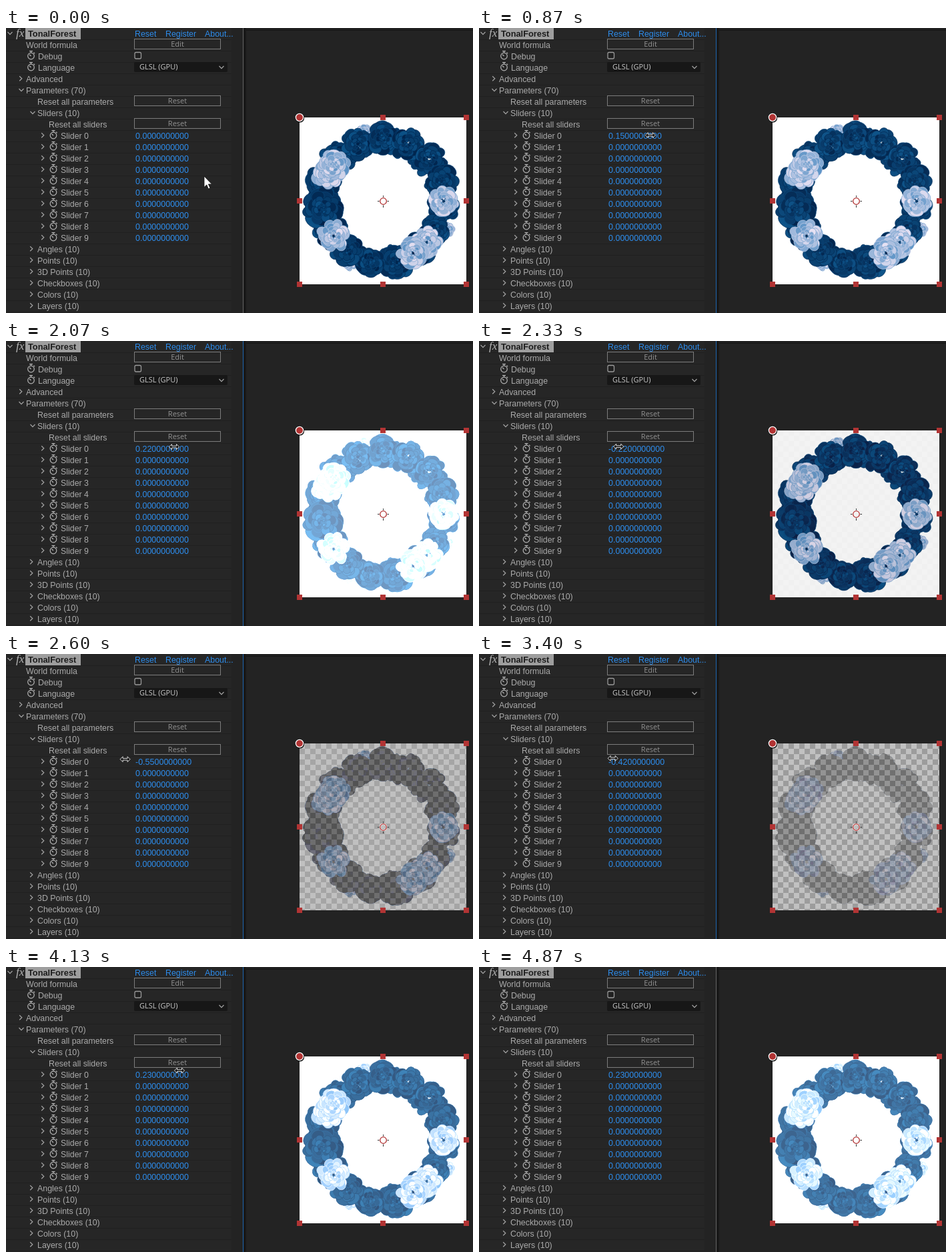
An HTML page for the animation above (4940 ms loop, 700x427 px).

```html
<!DOCTYPE html>
<html lang="en">
<head>
<meta charset="utf-8">
<title>Slider brightness</title>
<style>
  html, body { margin: 0; width: 100%; height: 100%; overflow: hidden; background: #232323; }
  svg { display: block; width: 700px; height: 427px; }
  text { font: 12.4px "Liberation Sans", Arial, sans-serif; fill: #aaa; white-space: pre; }
  .link { fill: #2d8ceb; }
  .value { fill: #2d8ceb; font-size: 12.5px; }
  .ui { font: 11px "Open Sans", "Noto Sans", sans-serif; fill: #929292; }
  .choice { fill: #c8c8c8; }
  .title { font-weight: bold; font-size: 12.8px; fill: #1c1c1c; }
  .fx { font: italic 17px "Liberation Serif", serif; fill: #b4b4b4; }
</style>
</head>
<body>
<svg viewBox="0 0 700 427" xmlns="http://www.w3.org/2000/svg">
  <defs>
    <pattern id="checker" x="440" y="134" width="16" height="16" patternUnits="userSpaceOnUse">
      <rect width="16" height="16" fill="#fff"/>
      <path d="M8 0h8v8h-8zM0 8h8v8h-8z" fill="#c0c0c0"/>
    </pattern>
    <filter id="shift" filterUnits="userSpaceOnUse" x="440" y="134" width="250" height="250"
            color-interpolation-filters="sRGB">
      <feColorMatrix id="matrix" type="matrix"/>
    </filter>
  </defs>
  <rect width="700" height="427" fill="#232323"/>
  <g id="panel"></g>
  <rect id="divider" x="355" width="1" height="427"/>
  <rect x="356" width="4" height="427" fill="#181818"/>
  <rect x="360" y="2" width="340" height="2" fill="#191919"/>
  <rect x="440" y="134" width="250" height="250" fill="url(#checker)"/>
  <g filter="url(#shift)">
    <rect x="440" y="134" width="250" height="250" fill="#fff"/>
    <g id="wreath"></g>
  </g>
  <g id="handles"></g>
  <path id="arrow" d="M0 0V16.5L3.8 13 6.4 19 9 17.9 6.4 12H11.5Z" fill="#fff" stroke="#111" stroke-width=".8"/>
  <path id="scrub" d="M-7.5 0L-3.5 -4V-1.3H3.5V-4L7.5 0 3.5 4V1.3H-3.5V4Z" fill="#161616" stroke="#f0f0f0" stroke-width=".9"/>
</svg>
<script>
const LOOP = 4940;
const STEP = 200 / 3;
const $ = id => document.getElementById(id);

function add(parent, tag, attrs, content) {
  const el = document.createElementNS('http://www.w3.org/2000/svg', tag);
  for (const key in attrs) el.setAttribute(key, attrs[key]);
  if (content !== undefined) el.textContent = content;
  parent.appendChild(el);
  return el;
}

// ---- Effect panel ----
const panel = $('panel');
const rowY = row => 8.3 + 17 * row;
const label = (x, row, text, cls = '') =>
  add(panel, 'text', { x, y: rowY(row) + 4.7, class: cls }, text);

function caret(x, row, open) {
  const d = open ? 'm-3.5 -1.8 3.5 3.6 3.5 -3.6' : 'm-1.8 -3.5 3.6 3.5 -3.6 3.5';
  add(panel, 'path', { d: `M${x} ${rowY(row) - 0.5}${d}`, fill: 'none', stroke: '#a4a4a4', 'stroke-width': 1.2 });
}

function stopwatch(x, row) {
  add(panel, 'path', {
    d: 'M-4.8 0a4.8 4.8 0 1 0 9.6 0a4.8 4.8 0 1 0 -9.6 0M-2.5 -7.3h5m-2.5 0v2.5M0 0l-2.4 -2.2M4 -5.2l1.6 1.4',
    transform: `translate(${x} ${rowY(row) - 0.3})`, fill: 'none', stroke: '#b4b4b4', 'stroke-width': 1.2
  });
}

function button(row, text) {
  const y = 17 * row;
  add(panel, 'rect', { x: 192.5, y: y - 0.5, width: 129, height: 15, fill: '#262626', stroke: '#7c7c7c' });
  add(panel, 'text', { x: 257, y: y + 11, class: 'ui', 'text-anchor': 'middle' }, text);
}

add(panel, 'rect', { width: 338, height: 427, fill: '#262626' });
for (let y = 17; y < 427; y += 17) add(panel, 'rect', { y, width: 338, height: 1, fill: '#202020' });

caret(6, 0, true);
add(panel, 'text', { x: 15, y: 12.5, class: 'fx' }, 'fx');
add(panel, 'rect', { x: 29, width: 83, height: 17, fill: '#9e9e9e' });
label(33, 0, 'TonalForest', 'title');
label(193, 0, 'Reset', 'link');
label(239, 0, 'Register', 'link');
label(298, 0, 'About...', 'link');

label(30, 1, 'World formula');
button(1, 'Edit');
stopwatch(37.5, 2);
label(48, 2, 'Debug');
add(panel, 'rect', { x: 193, y: 36.5, width: 9.5, height: 9.5, rx: 2, fill: '#202020', stroke: '#999', 'stroke-width': 1.3 });
stopwatch(37.5, 3);
label(48, 3, 'Language');
add(panel, 'rect', { x: 192, y: 51, width: 140, height: 15, rx: 2, fill: '#171717' });
add(panel, 'text', { x: 200, y: 62, class: 'ui choice' }, 'GLSL (GPU)');
caret(323, 3, true);

caret(22, 4, false);
label(30, 4, 'Advanced');
caret(23, 5, true);
label(30, 5, 'Parameters (70)');
label(47, 6, 'Reset all parameters');
button(6, 'Reset');
caret(40, 7, true);
label(47, 7, 'Sliders (10)');
label(64, 8, 'Reset all sliders');
button(8, 'Reset');

const values = [];
for (let i = 0; i < 10; i++) {
  caret(55, 9 + i, false);
  stopwatch(71, 9 + i);
  label(82, 9 + i, `Slider ${i}`);
  values.push(label(194, 9 + i, '0.0000000000', 'value'));
}
['Angles', 'Points', '3D Points', 'Checkboxes', 'Colors', 'Layers'].forEach((name, i) => {
  caret(38, 19 + i, false);
  label(47, 19 + i, `${name} (10)`);
});

// ---- Flower wreath ----
const TAU = Math.PI * 2;
const NAVY = [[0, 34, 74], [12, 82, 136]];
const PALE = [[92, 146, 196], [228, 222, 240]];
const wreath = $('wreath');
let seed = 11;
const rnd = () => (seed = (seed * 16807) % 2147483647) / 2147483647;
const tint = ([a, b], k) => `rgb(${a.map((c, i) => Math.round(c + (b[i] - c) * k))})`;
const polar = (x, y, dist, angle) => [x + dist * Math.cos(angle), y + dist * Math.sin(angle)];

function petal(x, y, dist, angle, rx, ry, colors) {
  const [px, py] = polar(x, y, dist, angle);
  const shade = rnd();
  add(wreath, 'ellipse', {
    rx: rx.toFixed(1), ry: ry.toFixed(1), fill: tint(colors, shade),
    stroke: tint(colors, shade > 0.5 ? 0.1 : 0.8), 'stroke-width': 0.6,
    transform: `translate(${px.toFixed(1)} ${py.toFixed(1)}) rotate(${(angle * 360 / TAU).toFixed(0)})`
  });
}

// Loose whorls of petals, tighter towards the heart.
function flower(x, y, r, colors) {
  for (let k = 0; k < 5; k++) {
    const size = r * (1 - 0.19 * k), n = 10 - k, spin = rnd() * TAU;
    for (let i = 0; i < n; i++) {
      const angle = spin + (i + rnd() * 0.7) * TAU / n;
      petal(x, y, size * (0.6 + rnd() * 0.14), angle, size * (0.24 + rnd() * 0.1), size * (0.26 + rnd() * 0.16), colors);
    }
  }
}

const bloom = (degrees, dist, r, colors) =>
  flower(...polar(565, 258, dist, degrees * TAU / 360), r, colors);

for (const degrees of [25, 99, 118, 200, 254]) bloom(degrees, 106, 12, PALE);
for (let i = 0; i < 160; i++)
  petal(565, 258, 73 + rnd() * 34, i * TAU / 160, 6 + rnd() * 4, 5 + rnd() * 4, NAVY);
for (let i = 0; i < 15; i++) bloom(i * 24 + 6, 90 + rnd() * 6, 23 + rnd() * 5, NAVY);
bloom(172, 91, 33, NAVY);
for (const degrees of [1, 44, 60, 144, 206, 216]) bloom(degrees, 91, 25, PALE);

// ---- Layer handles ----
const handles = $('handles');
const RED = '#b23434';
for (const x of [440, 565, 690])
  for (const y of [134, 259, 384])
    add(handles, 'rect', { x: x - 4, y: y - 4, width: 8, height: 8, fill: x === 565 && y === 259 ? 'none' : RED });
add(handles, 'circle', { cx: 440.5, cy: 135, r: 6.6, fill: '#111' });
add(handles, 'circle', { cx: 440, cy: 134, r: 5.6, fill: RED, stroke: '#fff', 'stroke-width': 1.3 });
add(handles, 'path', { d: 'M565.5 251v4M565.5 264v5M557 259.5h4M570 259.5h4', stroke: '#333', fill: 'none' });
for (const [stroke, width] of [['#fff', 2.4], [RED, 1.3]])
  add(handles, 'circle', { cx: 565.5, cy: 259.5, r: 4.8, fill: 'none', stroke, 'stroke-width': width });

// ---- Motion ----
const IMAGE_LAG = 110;
const POINTER_LEAD = 40;
const DRAG_START = 330, DRAG_END = 4250;

const clamp = u => Math.min(1, Math.max(0, u));
const easeOut = (t, from, to) => Math.sin(clamp((t - from) / (to - from)) * Math.PI / 2);
const lerp = (a, b, k) => a + (b - a) * k;
const round = v => Math.round(v * 100) / 100 || 0;

// Three strokes of the mouse: right, far left, back right.
const slider = t => 0.72 * easeOut(t, 747, 1647) - 1.46 * easeOut(t, 1803, 2993) + 0.97 * easeOut(t, 3186, 4186);

function pointer(t) {
  if (t < DRAG_START) {
    const k = easeOut(t, 20, DRAG_START);
    return [lerp(297, 237, k), lerp(222, 161, k)];
  }
  const leave = clamp((t - DRAG_END) / 280);
  const x = 237 + 100 * slider(t + POINTER_LEAD);
  const y = 161 - Math.max(0, t - 600) / 600;
  return [lerp(x, 104, leave), lerp(y, 432, leave)];
}

function draw(t) {
  const v = slider(t - IMAGE_LAG).toFixed(3);
  $('matrix').setAttribute('values', `1 0 0 0 ${v} 0 1 0 0 ${v} 0 0 1 0 ${v} 0 0 0 1 ${v}`);
  values[0].textContent = round(slider(t)).toFixed(10);
  $('divider').setAttribute('fill', t > 640 && t < 4860 ? '#1f66b0' : '#666');

  const scrubbing = t >= DRAG_START && t < DRAG_END;
  const place = `translate(${pointer(t).map(c => c.toFixed(1))})`;
  for (const [id, shown] of [['arrow', !scrubbing], ['scrub', scrubbing]]) {
    $(id).setAttribute('transform', place);
    $(id).setAttribute('visibility', shown ? 'visible' : 'hidden');
  }
}

const start = performance.now();
let last = -1;
function tick() {
  const step = Math.floor((((performance.now() - start) % LOOP) + 4) / STEP);
  if (step !== last) draw((last = step) * STEP);
  requestAnimationFrame(tick);
}
tick();
</script>
</body>
</html>
```
